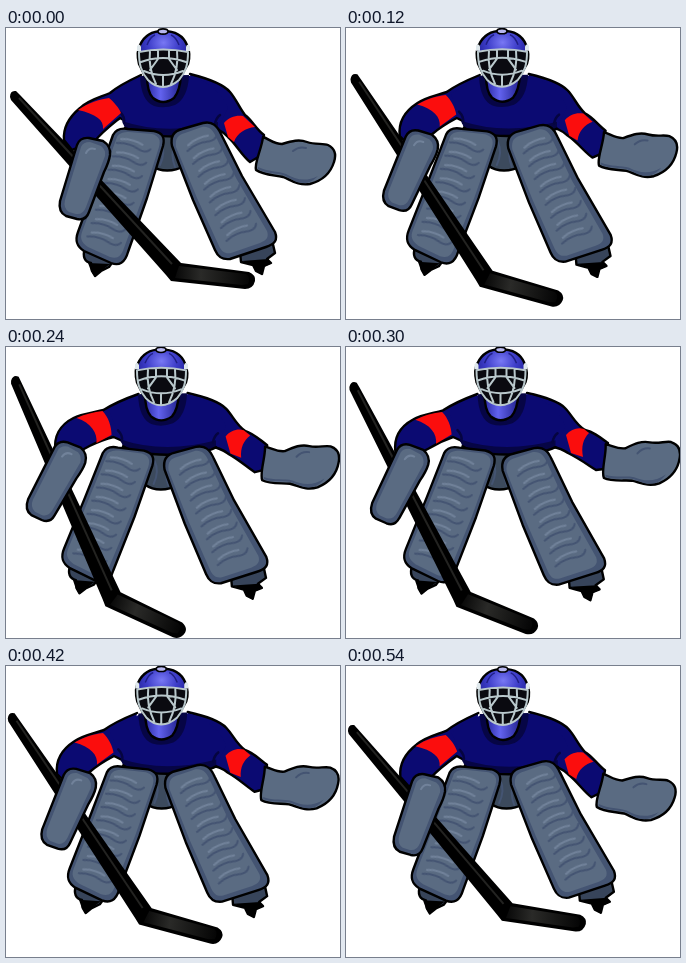
Write an HTML page that moves like this. It is 334x291 px and loops after 0.6 s.

```html
<!DOCTYPE html>
<html lang="en">
<head>
<meta charset="utf-8">
<title>Goalkeeper</title>
<style>
@property --stick { syntax: "<number>"; inherits: true; initial-value: 0; }
@property --slide { syntax: "<number>"; inherits: true; initial-value: 0; }
@property --catch { syntax: "<number>"; inherits: true; initial-value: 0; }
@property --leg { syntax: "<number>"; inherits: true; initial-value: 0; }

html, body { margin: 0; width: 100%; height: 100%; overflow: hidden; background: #fff; }
svg { display: block; width: 334px; height: 291px; animation: .6s infinite; animation-name: swing, slide, reach, lean; }

/* Each part moves evenly, in ten held poses per loop. */
@keyframes swing {
  0% { --stick: 0; animation-timing-function: steps(4); }
  40% { --stick: 1; animation-timing-function: steps(6); }
  100% { --stick: -.06; }
}
@keyframes slide {
  0% { --slide: 0; animation-timing-function: steps(4); }
  40% { --slide: 1.5; animation-timing-function: steps(2); }
  60%, 100% { --slide: -2; animation-timing-function: steps(4); }
}
@keyframes reach {
  0% { --catch: 0; animation-timing-function: steps(5); }
  50%, 60% { --catch: 1; animation-timing-function: steps(4); }
  100% { --catch: -.2; }
}
@keyframes lean {
  0% { --leg: 0; animation-timing-function: steps(3); }
  30%, 40% { --leg: 1; animation-timing-function: steps(6); }
  100% { --leg: .2; }
}

.stick {
  transform-origin: 8px 67px;
  transform: translate(calc(var(--slide) * 1px), calc(var(--stick) * -34px)) rotate(calc(var(--stick) * 18.5deg));
}
.blocker {
  transform-origin: 79px 151px;
  transform: translate(calc(var(--stick) * -30px + var(--slide) * 1px), calc(var(--stick) * -16px)) rotate(calc(var(--stick) * 10deg));
}
.glove {
  transform-origin: 289px 133px;
  transform: translate(calc(var(--catch) * 6px), calc(var(--catch) * -17px)) rotate(calc(var(--catch) * -9deg));
}
.left-leg {
  transform-origin: 133px 101px;
  transform: translateX(calc(var(--leg) * -10px)) rotate(calc(var(--leg) * 2.2deg));
}
.right-leg {
  transform-origin: 190px 97px;
  transform: translate(calc(var(--catch) * -9px), calc(var(--catch) * 6px)) rotate(calc(var(--catch) * 1deg));
}
.shorts { transform: translateX(calc(var(--catch) * -8px)); }
.head, .torso { transform: translate(calc(var(--catch) * -2.5px), calc(var(--catch) * -.8px)); }
.left-arm { transform: translateX(calc(var(--slide) * 1px)); }

.arm-l { animation: arm-l .6s infinite; }
.band-l { animation: band-l .6s infinite; }
.arm-r { animation: arm-r .6s infinite; }
.band-r { animation: band-r .6s infinite; }
@keyframes arm-l {
  0%, 100% { d: path("M135 47C120 54 112 58 104 65C92 70 82 72 74 80C62 90 57 100 58 112L66 122L88 114C96 104 104 98 114 90L128 98"); animation-timing-function: steps(4); }
  40% { d: path("M131 47C114 53 104 58 96 63C84 66 74 67 66 71C52 78 46 90 48 104L58 112L82 99C90 95 97 92 106 90L124 98"); animation-timing-function: steps(6); }
}
@keyframes band-l {
  0%, 100% { d: path("M72 82C84 74 92 72 103 70C108 74 113 80 115 85L97 101C98 92 90 86 72 82Z"); animation-timing-function: steps(4); }
  40% { d: path("M69 71C78 67 86 65 95 64C101 70 104 80 104 88L89 96C90 86 84 76 69 71Z"); animation-timing-function: steps(6); }
}
@keyframes arm-r {
  0%, 100% { d: path("M184 46C204 51 218 57 224 64C230 71 233 79 239 87C246 92 250 101 258 107L254 128L244 134C236 128 230 116 222 109C214 100 206 100 190 95"); animation-timing-function: steps(5); }
  50%, 60% { d: path("M181 46C200 50 212 54 219 61C226 68 229 77 239 83C248 85 254 90 262 96L258 122L250 123C242 118 234 112 222 106C214 100 206 100 190 95"); animation-timing-function: steps(4); }
}
@keyframes band-r {
  0%, 100% { d: path("M218 95C223 89 230 87 237 88L249 99C240 100 231 105 228 114L222 109Z"); animation-timing-function: steps(5); }
  50%, 60% { d: path("M220 88C225 82 232 80 238 82L243 86C237 92 235 100 237 110L225 106Z"); animation-timing-function: steps(4); }
}

.ink { stroke: #000; stroke-width: 2.4; stroke-linejoin: round; stroke-linecap: round; }
.navy { fill: #0b0a72; }
.dusk { fill: #060545; }
.red { fill: #fb0d0d; }
.slate { fill: #445472; }
.steel { fill: #5a6b82; }
.boot { fill: #37445a; }
.shade { fill: none; stroke: #445472; stroke-width: 2; stroke-linecap: round; }
.shine { fill: none; stroke: #71829a; stroke-width: 2; stroke-linecap: round; }
.fold { fill: none; stroke: #050440; stroke-width: 2.5; stroke-linecap: round; }
.cage { fill: none; stroke: #b9c8cc; stroke-width: 2; stroke-linecap: round; stroke-linejoin: round; }
</style>
</head>
<body>
<svg viewBox="0 0 334 291">
  <defs>
    <radialGradient id="shell" cx=".5" cy=".25" r=".6">
      <stop stop-color="#7878f4"/>
      <stop offset=".5" stop-color="#3c3cc8"/>
      <stop offset="1" stop-color="#1c1c8c"/>
    </radialGradient>
    <linearGradient id="chin" x2="1" y2="0">
      <stop stop-color="#2a2aa4"/>
      <stop offset=".4" stop-color="#6262ee"/>
      <stop offset="1" stop-color="#22228e"/>
    </linearGradient>
    <linearGradient id="blade" x2="1" y2="0">
      <stop stop-color="#080808"/>
      <stop offset=".35" stop-color="#2a2a28"/>
      <stop offset="1" stop-color="#050505"/>
    </linearGradient>
    <pattern id="ribs" x="-24" y="10" width="48" height="14" patternUnits="userSpaceOnUse">
      <path class="shade" d="M7 10Q18 6 28 9T41 6"/>
      <path class="shine" d="M10 5Q20 1 32 4"/>
    </pattern>
    <path id="rib-panel" fill="url(#ribs)" d="M-24 10H24V122H-24Z"/>
  </defs>

  <g class="shorts">
    <path class="ink" fill="#3c4a5d" d="M146 104H178L178 138C168 144 154 144 146 138Z"/>
    <path class="shade" d="M155 114Q160 124 154 137M169 116Q164 126 169 139"/>
  </g>

  <g class="left-arm">
    <path class="arm-l navy ink" d="M135 47C120 54 112 58 104 65C92 70 82 72 74 80C62 90 57 100 58 112L66 122L88 114C96 104 104 98 114 90L128 98"/>
  </g>
  <path class="arm-r navy ink" d="M184 46C204 51 218 57 224 64C230 71 233 79 239 87C246 92 250 101 258 107L254 128L244 134C236 128 230 116 222 109C214 100 206 100 190 95"/>
  <g class="torso">
    <path class="navy" d="M137 48C126 54 116 58 106 67L116 90L119 99C132 110 190 112 212 100L222 80C217 66 202 52 184 48Z"/>
    <path class="dusk" d="M116 93Q160 108 212 94L212 100C190 112 132 110 119 100Z"/>
    <path class="fold" d="M119 100C134 110 190 112 212 101" style="stroke: #000"/>
    <path class="dusk" d="M134 48Q135 73 148 78Q158 81 169 77Q182 70 183 47Z"/>
    <path class="fold" d="M118 95Q119 89 114 84M209 96Q210 90 214 87"/>
  </g>
  <g class="left-arm">
    <path class="band-l red" d="M72 82C84 74 92 72 103 70C108 74 113 80 115 85L97 101C98 92 90 86 72 82Z"/>
  </g>
  <path class="band-r red" d="M218 95C223 89 230 87 237 88L249 99C240 100 231 105 228 114L222 109Z"/>

  <g class="left-leg">
    <path class="boot ink" d="M79 220C76 229 79 234 85 235L86 243L89 248L95 243L103 239L108 232Z"/>
    <path d="M82 235L104 236L95 243L89 249L85 243Z"/>
    <path class="slate ink" d="M107 107C110 101 116 100 122 101L148 103C157 105 159 110 157 118L141 170L122 224C119 235 113 238 105 235L78 223C70 218 69 212 72 204L91 152Z"/>
    <path class="steel" d="M111 109C113 105 118 104 123 104L146 106C153 108 155 112 153 119L137 169L118 220C115 229 111 231 104 229L82 219C75 214 74 210 76 204L95 153Z"/>
    <use href="#rib-panel" transform="translate(133 101) rotate(17.5)"/>
  </g>
  <g class="right-leg">
    <path class="boot ink" d="M234 224L235 234L247 237L250 243L256 246L258 238L265 235L261 231L269 225L266 212Z"/>
    <path d="M236 233L262 231L264 236L258 239L256 247L250 243L247 237Z"/>
    <path class="slate ink" d="M166 118C164 108 168 103 176 101L197 95C206 93 211 97 215 106L236 148L269 204C272 212 269 216 260 219L224 231C216 232 212 229 209 222L187 172Z"/>
    <path class="steel" d="M170 119C169 110 172 107 179 105L196 99C203 98 207 102 210 109L230 150L261 203C263 209 261 212 254 215L225 225C219 226 216 224 213 218L191 170Z"/>
    <use href="#rib-panel" transform="translate(189 98) rotate(-23.500)"/>
  </g>

  <g class="head">
    <path class="ink" fill="url(#chin)" d="M141 47Q141 64 147 70Q157 78 168 70Q174 63 175 47Z"/>
    <path class="ink" fill="url(#shell)" d="M133 36C131 28 131 22 134 17C139 6 148 3 157 3C168 3 177 7 181 17C184 24 184 30 182 36L174 50H140Z"/>
    <ellipse cx="157" cy="3.500" rx="5" ry="2.600" fill="#b7b7ee" stroke="#000" stroke-width="1.600"/>
    <path fill="none" stroke="#1f1f86" stroke-width="1.500" d="M141 17Q144 9 149 7M173 17Q170 9 165 7"/>
    <path fill="#0a0a10" d="M133 24Q157 19 182 24C182 36 180 44 173 52Q165 59 157 59Q149 59 142 52C135 44 133 36 133 24Z"/>
    <path class="cage" d="M133 24Q157 19 182 24C182 36 180 44 173 52Q165 59 157 59Q149 59 142 52C135 44 133 36 133 24ZM135 34Q157 26 180 34M138 43Q157 51 177 43M144 23Q142 40 150 56M171 23Q173 40 165 56M152 22V31L144 42M163 22V31L171 42M157 47V58"/>
    <path fill="#dfe8ec" d="M131 18Q134 15 135 19V23H131ZM180 19Q181 15 184 18V23H180Z"/>
  </g>

  <g class="stick">
    <path d="M4 69Q4 62 10 63L14 67L175 235L243 244Q250 247 249 253Q247 261 239 261L165 253L160 247L5 72Z"/>
    <path fill="url(#blade)" d="M173 238L240 246Q245 249 242 256L236 257L169 250Z"/>
    <path fill="none" stroke="#232321" stroke-width="2" d="M13 70L166 236"/>
  </g>

  <g class="blocker">
    <path class="slate ink" d="M71 117Q74 109 83 110L97 113Q105 118 104 127Q103 134 98 144L83 184Q80 193 71 191L60 188Q52 184 54 173Z"/>
    <path class="steel" d="M75 119Q77 114 84 114L95 118Q100 122 99 128L80 179Q77 187 70 186L63 184Q57 180 59 172Z"/>
    <path class="shine" d="M80 125Q83 119 89 121"/>
  </g>

  <g class="glove">
    <path class="steel ink" d="M257 109C263 111 268 116 276 116C286 113 293 111 301 114C309 117 317 115 322 117C330 121 330 128 328 134C324 147 315 153 304 156C292 158 285 152 277 149C268 147 257 147 250 142C248 135 256 120 257 109Z"/>
    <path class="slate" d="M252 139C262 144 272 143 280 146C290 152 300 154 312 148Q306 154 300 155C289 156 285 150 277 147C268 145 257 145 252 141Z"/>
    <path class="shade" d="M287 123Q293 118 300 120"/>
  </g>
</svg>
</body>
</html>
```
